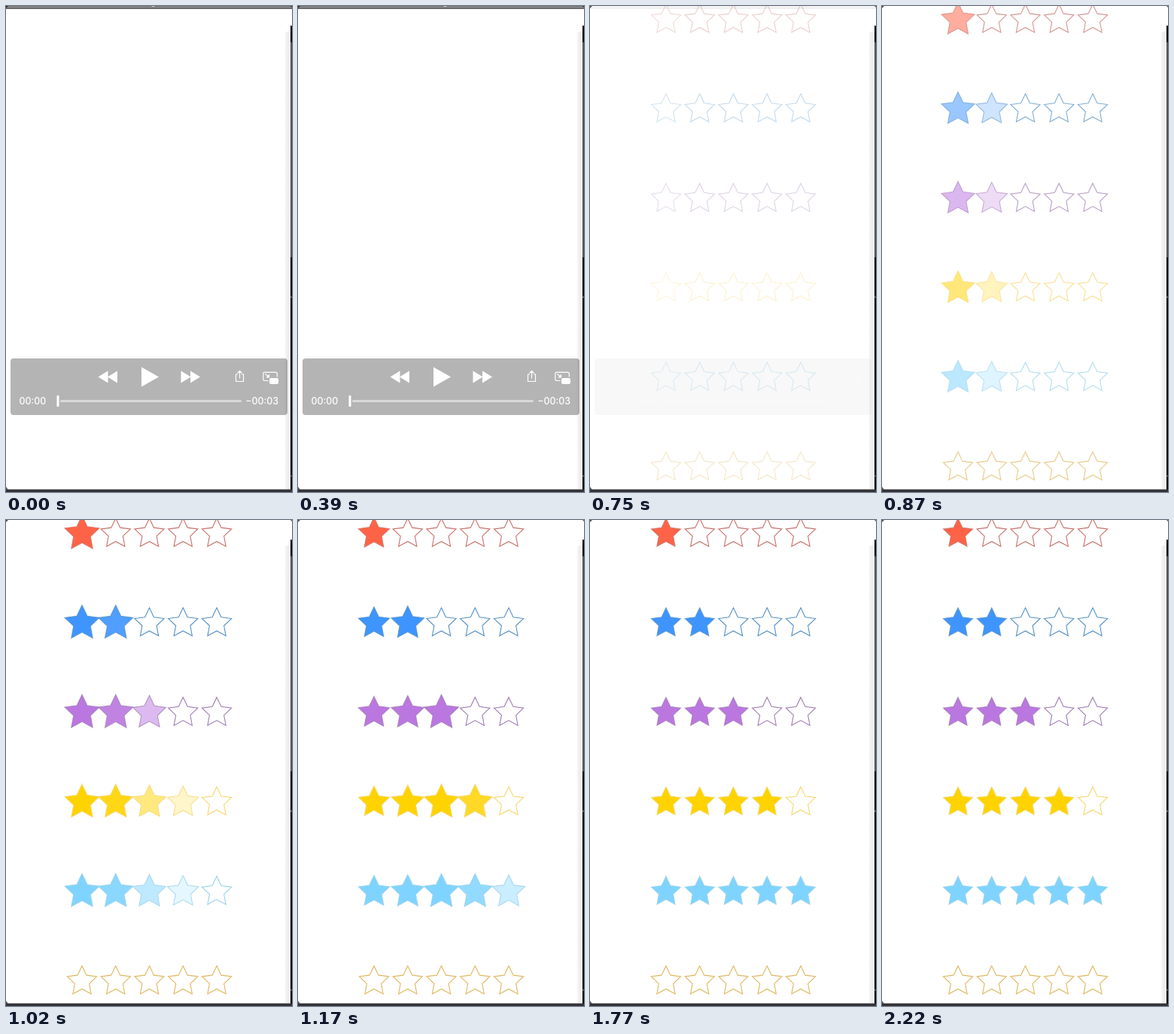
Write an HTML page with a canvas that moves like this. It is 380 px wide and 644 px high and loops after 2250 ms.

```html
<!DOCTYPE html>
<html lang="en">
<head>
<meta charset="utf-8">
<title>Star ratings</title>
<style>
html, body { margin: 0; width: 100%; height: 100%; overflow: hidden; background: #fff; }
canvas { display: block; width: 380px; height: 644px; }
</style>
</head>
<body>
<canvas id="stage" width="380" height="644"></canvas>
<script>
const ctx = document.getElementById('stage').getContext('2d');
const LOOP = 2250, PLAY_AT = 480;
const ROWS = [
  { fill: '#ff6347', line: '#c8706a', score: 1 },
  { fill: '#3f95ff', line: '#5590c4', score: 2 },
  { fill: '#bb77e0', line: '#a07db4', score: 3 },
  { fill: '#ffd300', line: '#f6d670', score: 4 },
  { fill: '#7fd4ff', line: '#98d0ea', score: 5 },
  { fill: '#fff', line: '#dfb75e', score: 0 }
];
const STARTS = [750, 812, 905, 975, 1075];

const clamp = v => Math.max(0, Math.min(1, v));
const ramp = (t, from, to) => clamp((t - from) / (to - from));

function rect(x, y, w, h, color) {
  ctx.fillStyle = color;
  ctx.fillRect(x, y, w, h);
}

function poly(points) {
  ctx.beginPath();
  points.forEach(([x, y]) => ctx.lineTo(x, y));
  ctx.closePath();
}

function pill(x, y, w, h, r) {
  ctx.beginPath();
  ctx.roundRect(x, y, w, h, r);
}

function starPath(x, y, radius) {
  poly(Array.from({ length: 10 }, (_, i) => {
    const a = -Math.PI / 2 + i * Math.PI / 5;
    const r = i % 2 ? radius * 0.49 : radius;
    return [x + r * Math.cos(a), y + r * Math.sin(a)];
  }));
}

// Quick swell, then a soft return to full size
function pop(age) {
  if (age <= 0 || age >= 540) return 1;
  const k = age < 240
    ? Math.sin(age / 240 * Math.PI / 2)
    : (1 + Math.cos((age - 240) / 300 * Math.PI)) / 2;
  return 1 + 0.18 * k;
}

function drawStars(t) {
  const shown = ramp(t, 650, 950);
  if (!shown) return;
  ctx.lineWidth = 1.1;
  ctx.lineJoin = 'miter';
  ROWS.forEach((row, r) => {
    for (let i = 0; i < 5; i++) {
      const age = i < row.score ? t - STARTS[i] : 0;
      starPath(101 + 44.75 * i, 136.9 + 118.6 * (r - 1), 20.6 * pop(age));
      ctx.globalAlpha = clamp(age / 230);
      ctx.fillStyle = row.fill;
      ctx.fill();
      ctx.globalAlpha = shown * (age > 0 ? 0.75 : 1);
      ctx.strokeStyle = row.line;
      ctx.stroke();
    }
  });
  ctx.globalAlpha = 1;
}

function drawFrame() {
  const shade = ctx.createLinearGradient(370, 0, 378, 0);
  shade.addColorStop(0, '#fff');
  shade.addColorStop(0.3, '#f1f1f1');
  shade.addColorStop(1, '#ececec');
  rect(370, 34, 8, 606, shade);
  rect(378, 26, 2, 618, '#000');
  rect(378, 48, 2, 285, '#555');
  rect(378, 385, 2, 1.5, '#777');
  rect(378, 622, 2, 1.5, '#666');
  rect(0, 640.5, 380, 3.5, '#333236');
  ctx.fillStyle = '#555';
  poly([[0, 0], [3, 0], [0, 3]]);
  ctx.fill();
  poly([[380, 0], [378, 0], [380, 2]]);
  ctx.fill();
  poly([[0, 637], [3, 641], [0, 641]]);
  ctx.fill();
}

function triangle(x, y, w, h) {
  poly([[x, y - h / 2], [x + w, y], [x, y + h / 2]]);
  ctx.fill();
}

function drawShare() {
  ctx.beginPath();
  ctx.moveTo(308, 488);
  ctx.lineTo(305.5, 488);
  ctx.lineTo(305.5, 497.5);
  ctx.lineTo(315.5, 497.5);
  ctx.lineTo(315.5, 488);
  ctx.lineTo(313, 488);
  ctx.moveTo(310.5, 493.5);
  ctx.lineTo(310.5, 483.5);
  ctx.moveTo(307.5, 486.5);
  ctx.lineTo(310.5, 483.5);
  ctx.lineTo(313.5, 486.5);
  ctx.stroke();
}

function drawInset() {
  ctx.beginPath();
  ctx.moveTo(348.5, 496.5);
  ctx.lineTo(343.5, 496.5);
  ctx.quadraticCurveTo(341.8, 496.5, 341.8, 494.8);
  ctx.lineTo(341.8, 487);
  ctx.quadraticCurveTo(341.8, 485.3, 343.5, 485.3);
  ctx.lineTo(358.5, 485.3);
  ctx.quadraticCurveTo(360.3, 485.3, 360.3, 487);
  ctx.lineTo(360.3, 491.5);
  ctx.moveTo(344.5, 487.5);
  ctx.lineTo(349, 491.5);
  ctx.stroke();
  poly([[350, 487.8], [350, 492.5], [345.2, 492.5]]);
  ctx.fill();
  pill(350, 493, 12, 8, 2);
  ctx.fill();
}

function drawControls(t) {
  const alpha = 1 - ramp(t, 570, 770);
  if (!alpha) return;
  ctx.globalAlpha = alpha;
  rect(0, 0, 380, 3, 'rgba(0,0,0,.5)');
  rect(0, 3, 380, 1, 'rgba(0,0,0,.65)');
  pill(193, -3, 5, 4, 2);
  ctx.fillStyle = '#ddd';
  ctx.fill();
  pill(6, 467, 368, 75, 4);
  ctx.fillStyle = 'rgba(0,0,0,.295)';
  ctx.fill();

  ctx.globalAlpha = Math.min(1, alpha * 1.4);
  ctx.fillStyle = ctx.strokeStyle = '#fff';
  ctx.lineWidth = 1.2;
  triangle(148, 491.5, -13, 16);
  triangle(135.5, 491.5, -13, 16);
  triangle(232.5, 491.5, 13, 16);
  triangle(245, 491.5, 13, 16);
  if (t < PLAY_AT) {
    triangle(180, 491.5, 23, 26);
  } else {
    ctx.fillRect(180, 480, 7, 24);
    ctx.fillRect(193, 480, 7, 24);
  }
  drawShare();
  drawInset();

  const knob = 67.5 + Math.max(0, t - PLAY_AT) * 0.083;
  pill(knob + 4.5, 522, 313 - knob - 4.5, 3, 1.5);
  ctx.fillStyle = 'rgba(255,255,255,.5)';
  ctx.fill();
  ctx.fillStyle = '#fff';
  if (knob > 69) {
    pill(66.5, 522, knob - 68, 3, 1);
    ctx.fill();
  }
  pill(knob, 516, 3, 15, 1);
  ctx.fill();

  ctx.font = '500 12.4px Inter, "Open Sans", sans-serif';
  ctx.textBaseline = 'alphabetic';
  ctx.textAlign = 'left';
  ctx.fillText('00:00', 17.5, 528);
  ctx.textAlign = 'right';
  ctx.fillText('−00:03', 362, 528);
  ctx.globalAlpha = 1;
}

function draw(t) {
  rect(0, 0, 380, 644, '#fff');
  drawStars(t);
  drawFrame();
  drawControls(t);
}

const begin = performance.now();
function tick() {
  draw((performance.now() - begin) % LOOP);
  requestAnimationFrame(tick);
}
tick();
</script>
</body>
</html>
```
